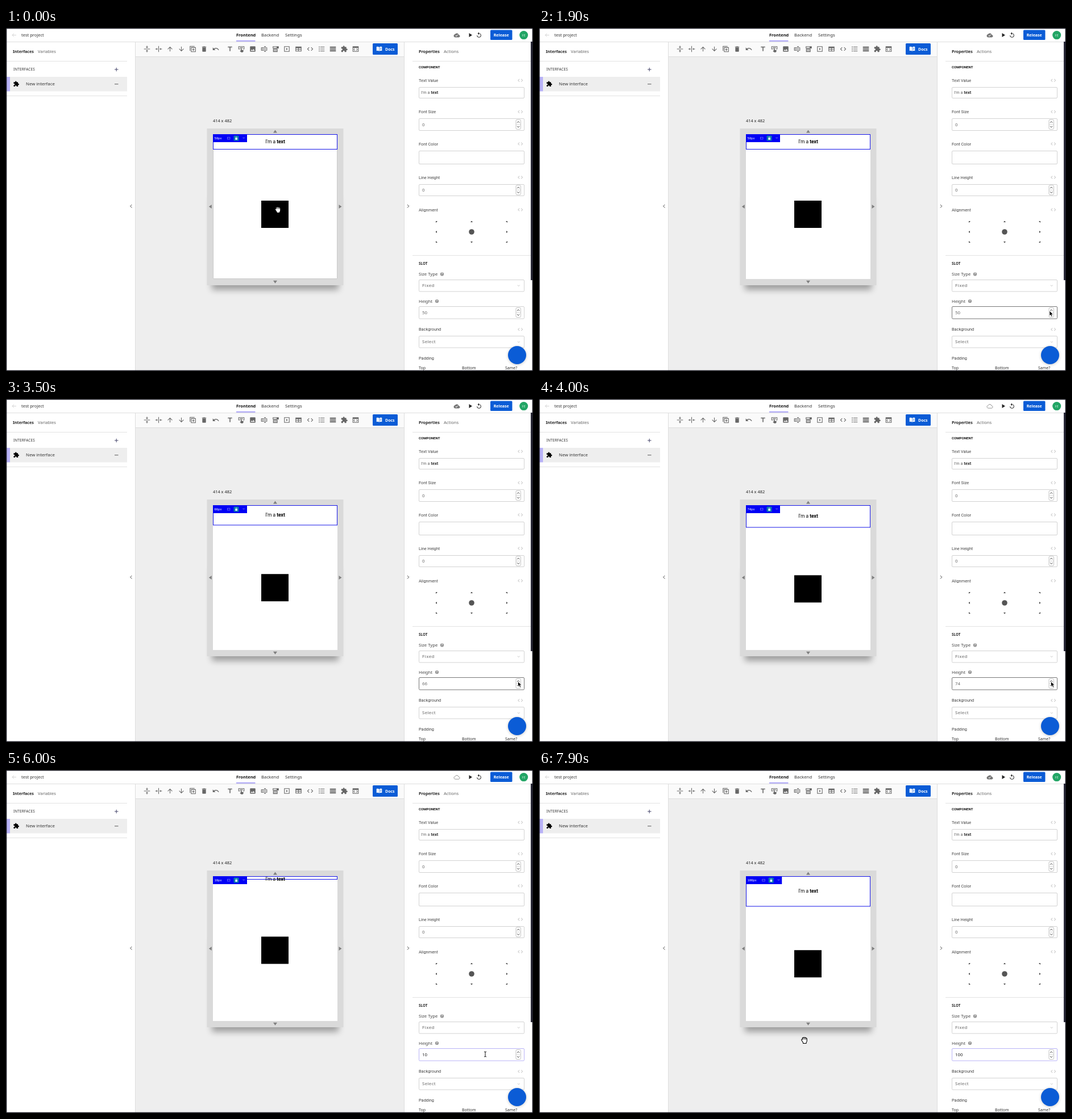
An HTML page for the animation above (8 s loop, 927 by 604 pixels).

```html
<!DOCTYPE html>
<html lang="en">
<head>
<meta charset="utf-8">
<title>Interface editor</title>
<style>
html, body { margin: 0; width: 100%; height: 100%; overflow: hidden; background: #fff; }
svg { display: block; width: 927px; height: 604px; }
text { font-family: "Noto Sans", sans-serif; white-space: pre; }
text.r { font-family: Roboto, sans-serif; }
text.m { font-family: "DejaVu Sans Mono", monospace; }
</style>
</head>
<body>
<svg id="stage" viewBox="0 0 927 604" xmlns="http://www.w3.org/2000/svg"></svg>
<script>
const NS = 'http://www.w3.org/2000/svg';
const stage = document.getElementById('stage');
const BLUE = '#0b5cd6', INK = '#333', GREY = '#666', PALE = '#bdbdbd';

function add(tag, attrs, parent = stage) {
  const el = document.createElementNS(NS, tag);
  for (const k in attrs) el.setAttribute(k, attrs[k]);
  return parent.appendChild(el);
}
const rect = (x, y, width, height, fill, more, parent) =>
  add('rect', { x, y, width, height, fill, ...more }, parent);
const circle = (cx, cy, r, fill, more) => add('circle', { cx, cy, r, fill, ...more });
const path = (d, more, parent) => add('path', { d, ...more }, parent);
const line = (d, stroke = INK, w = 1, parent) =>
  path(d, { fill: 'none', stroke, 'stroke-width': w }, parent);
const group = (parent) => add('g', {}, parent);

function text(x, y, str, size, fill = INK, more = {}, parent) {
  const el = add('text', { x, y, 'font-size': size, fill, ...more }, parent);
  el.textContent = str;
  return el;
}
const roboto = (x, y, str, size = 7.4, fill = '#444', more) =>
  text(x, y, str, size, fill, { class: 'r', ...more });

// Icons live on a 24 unit grid
function icon(d, x, y, size = 12.7, fill = GREY, turn = 0) {
  const k = size / 24;
  return path(d, { fill, 'fill-rule': 'evenodd',
    transform: `translate(${x} ${y}) rotate(${turn}) scale(${k}) translate(-12 -12)` });
}
const ICON = {
  split: 'M8 19h3v4h2v-4h3l-4-4-4 4zm8-14h-3V1h-2v4H8l4 4 4-4zM2 11v2h20v-2z',
  up: 'M4 12l1.41 1.41L11 7.83V20h2V7.83l5.58 5.59L20 12l-8-8-8 8z',
  copy: 'M2 2h16v2H4v14H2zM6 6h16v16H6zM8 8v12h12V8zM13 10h2v3h3v2h-3v3h-2v-3h-3v-2h3z',
  bin: 'M6 19c0 1.1.9 2 2 2h8c1.1 0 2-.9 2-2V7H6v12zM19 4h-3.5l-1-1h-5l-1 1H5v2h14V4z',
  undo: 'M12.5 8c-2.65 0-5.05.99-6.9 2.6L2 7v9h9l-3.62-3.62c1.39-1.16 3.16-1.88 5.12-1.88 3.54 0 6.55 2.31 7.6 5.5l2.37-.78C21.08 11.03 17.15 8 12.5 8z',
  title: 'M5 4v3h5.5v12h3V7H19V4z',
  button: 'M2 3h20v10h-4v-2h2V5H4v6h4v2H2zM7 7h10v2H7zM10 10h3v5l6 1v3l-2 4h-6l-4-5 1-1 2 1z',
  image: 'M21 19V5c0-1.1-.9-2-2-2H5c-1.1 0-2 .9-2 2v14c0 1.1.9 2 2 2h14c1.1 0 2-.9 2-2zM8.500 13.500l2.500 3L14.500 12l4.500 6H5z',
  input: 'M2 7h10v2H4v6h8v2H2zM18 7h4v10h-4v-2h2V9h-2zM12 3h6v2h-2v14h2v2h-6v-2h2V5h-2zM6 11h5v2H6z',
  select: 'M2 3h20v7H2zM4 5v3h11V5zM3 11h15v11H3zM5 13v1.500h11V13zM5 16v1.500h11V16zM5 19v1h11v-1z',
  play: 'M10 8v8l5-4zM3 3h18v18H3zM5 5v14h14V5z',
  table: 'M2 4h20v16H2zM4 9v3.500h7V9zM13 9v3.500h7V9zM4 14.500V18h7v-3.500zM13 14.500V18h7v-3.500z',
  code: 'M9.400 16.600L4.800 12l4.600-4.600L8 6l-6 6 6 6zM14.600 16.600l4.600-4.600-4.600-4.600L16 6l6 6-6 6z',
  list: 'M3 4h3v3H3zM3 10.500h3v3H3zM3 17h3v3H3zM8 4.500h14v2H8zM8 11h14v2H8zM8 17.500h14v2H8z',
  bars: 'M2 4h20v4H2zM2 10h20v4H2zM2 16h20v4H2z',
  puzzle: 'M20.5 11H19V7c0-1.1-.9-2-2-2h-4V3.5C13 2.12 11.88 1 10.500 1S8 2.12 8 3.500V5H4c-1.1 0-2 .9-2 2v3.800h1.500c1.490 0 2.700 1.210 2.700 2.700s-1.210 2.700-2.700 2.700H2V20c0 1.1.9 2 2 2h3.800v-1.500c0-1.490 1.210-2.700 2.700-2.700s2.700 1.210 2.700 2.700V22H17c1.1 0 2-.9 2-2v-4h1.500c1.380 0 2.500-1.120 2.500-2.500S21.880 11 20.500 11z',
  embed: 'M2 3h20v18H2zM4 8v11h16V8zM10 10l-3 3.500 3 3.500-1.500 1L5 13.500 8.500 9zM14 10l3 3.500-3 3.500 1.500 1 3.500-4.500L15.500 9z',
  reset: 'M12 5V1L7 6l5 5V7c3.310 0 6 2.690 6 6s-2.690 6-6 6-6-2.690-6-6H4c0 4.420 3.580 8 8 8s8-3.580 8-8-3.580-8-8-8z',
  cloud: 'M19.350 10.040C18.670 6.590 15.640 4 12 4 9.110 4 6.600 5.640 5.350 8.040 2.340 8.360 0 10.910 0 14c0 3.310 2.690 6 6 6h13c2.760 0 5-2.240 5-5 0-2.640-2.050-4.780-4.650-4.960z',
  tick: 'M10 17l-3.500-3.500 1.410-1.410L10 14.170 15.180 9l1.410 1.410z',
  book: 'M2 4c4-1 7-1 9.500 1v15C9 18 6 18 2 19zM22 4c-4-1-7-1-9.500 1v15c2.500-2 5.500-2 9.500-1zM14.500 8v1.500l5-.7V7.300zM14.500 12v1.500l5-.7v-1.500z'
};

// Panels
rect(0, 0, 927, 604, '#fff');
rect(228, 50, 472, 554, '#eee');
rect(228, 25, 472, 25, '#fafafa');
line('M0 24.500H927M227.500 24V604M700.500 24V604M228 50.500H700', '#dedede');
line('M1 58.500H213M1 119.500H213M715 58.500H923M715 400.500H923', '#e2e2e2');

// Top bar
line('M18 12.500H11M14 9.500L11 12.500L14 15.500', '#d4d4d4');
text(27, 15.200, 'test project', 7.5);
text(405, 15.300, 'Frontend', 7.5, '#111', { 'font-weight': 600 });
text(449, 15.300, 'Backend', 7.75);
text(491, 15.300, 'Settings', 7.8);
rect(405, 21.500, 33.500, 2.500, '#b9b3f7');
path('M814.500 9v7l5.500-3.500z', { fill: '#222' });
icon(ICON.reset, 832, 12.500, 11.500, '#222');
rect(852, 3.500, 38.500, 17.500, BLUE, { rx: 1.500 });
text(871.200, 15, 'Release', 7, '#fff', { 'font-weight': 600, 'text-anchor': 'middle' });
circle(910.700, 12.600, 7.500, '#22a565');
text(910.700, 14.700, 'FE', 5.800, '#c4ecd6', { 'text-anchor': 'middle' });
const saved = icon(ICON.cloud + ICON.tick, 793, 12.800, 11, '#757575');
const saving = icon(ICON.cloud, 793, 12.800, 10, 'none');
saving.setAttribute('stroke', '#777');
saving.setAttribute('stroke-width', 1.900);

// Left panel
text(12, 43.700, 'Interfaces', 7.2, '#222', { 'font-weight': 600 });
text(56, 43.700, 'Variables', 7.4, GREY);
text(13, 75.300, 'INTERFACES', 6.3, INK, { 'font-weight': 500, 'letter-spacing': .2 });
line('M191 73H197.500M194.200 69.800V76.300', '#32325a', .9);
rect(7, 86, 206, 25.500, '#eee');
rect(1, 86, 6, 25.500, '#b9b3f7');
icon(ICON.puzzle, 18, 98.500, 11, '#000');
text(35, 101.300, 'New interface', 7.8);
line('M191 98.800H197.500', '#444', .9);
line('M221.300 311L218.700 313.700L221.300 316.500M706 311L708.700 313.700L706 316.500', INK, .9);

// Tool bar
const tools = [['split', 248], ['split', 268.5, 90], ['up', 288.5], ['up', 308.5, 180],
  ['copy', 328.5], ['bin', 348.5], ['undo', 369], ['title', 394], ['button', 414],
  ['image', 434], ['input', 454], ['select', 474.5], ['play', 494], ['table', 514.5],
  ['code', 535], ['list', 555], ['bars', 575], ['puzzle', 595], ['embed', 615]];
for (const [name, x, turn] of tools) icon(ICON[name], x, 37, 12.700, GREY, turn);
rect(645, 27, 44, 20, BLUE, { rx: 1.500 });
icon(ICON.book, 656.500, 37, 11.500, '#fff');
text(667, 39.700, 'Docs', 7, '#fff', { 'font-weight': 600 });

// Artboard
text(364, 165.600, '414 x 482', 7.4, '#222');
rect(362, 300, 223, 161, '#000', { opacity: .34, style: 'filter:blur(6px)' });
rect(353.500, 177, 240, 276, '#dadada');
rect(364, 187, 219, 255, '#fff');
path('M470 184.500h7l-3.500-5zM470 444.800h7l-3.500 5zM361.800 311v7l-5-3.500zM585.500 311v7l5-3.500z',
  { fill: '#808080' });
const hover = line('M364.500 213V441.500H582.500V213', '#c9c9c9');
const mark = rect(449, 304, 48, 48, '#000');
const slot = rect(364.500, 187.500, 218, 26, 'none', { stroke: '#1616e8' });
const title = text(473.500, 203, "I'm a ", 8.46, '#000', { class: 'r', 'text-anchor': 'middle' });
add('tspan', { 'font-weight': 700 }, title).textContent = 'text';
const tag = rect(364, 187, 60, 14, '#0000f5');
const tagText = text(366.500, 196, '', 5.4, '#fff', { class: 'm' });
const tagIcons = group();
rect(389.500, 192.300, 4.500, 3.500, 'none', { stroke: '#8383ee', 'stroke-width': .7 }, tagIcons);
rect(400.500, 189.500, 9, 9, '#0878ad', { rx: 1 }, tagIcons);
rect(403.300, 193.500, 3.600, 3.200, '#fff', {}, tagIcons);
line('M404 193.500V192.500Q405.100 190.700 406.200 192.500V193.500', '#fff', .7, tagIcons);
line('M416 193.300H420.500M418.200 193.300V195', '#7171e8', .7, tagIcons);

// Properties panel
text(726, 43.700, 'Properties', 7.1, '#222', { 'font-weight': 600 });
text(770, 43.700, 'Actions', 7.6, GREY);
roboto(726, 71.300, 'COMPONENT', 6.1, '#111', { 'font-weight': 700 });

const field = (y, h) => rect(726.500, y + .5, 185, h, '#fff', { rx: 1.500, stroke: '#d2d2d2' });
function spinner(y) {
  rect(897, y - 8.500, 8.500, 17, '#fff', { rx: 2, stroke: '#b5b5b5', 'stroke-width': .8 });
  line(`M897 ${y}h8.500`, '#c4c4c4', .7);
  line(`M899 ${y - 3}l2.200 -2.200l2.200 2.200M899 ${y + 3}l2.200 2.200l2.200 -2.200`, '#333', .9);
}
const chevron = (y) => line(`M899.800 ${y}l2 1.700l2 -1.700`, PALE, .8);
function help(x, y) {
  circle(x, y, 3.100, '#949494');
  text(x, y + 1.900, '?', 5, '#fff', { 'text-anchor': 'middle', 'font-weight': 700 });
}

const labels = [['Text Value', 92.3], ['Font Size', 147.5], ['Font Color', 204],
  ['Line Height', 263], ['Alignment', 320], ['Background', 530.7]];
for (const [name, y] of labels) {
  roboto(726, y + 2.600, name);
  icon(ICON.code, 904.700, y, 11, '#c6c6c6');
}
field(104, 19);
const value = roboto(730, 116.400, "I'm a ", 7.4, GREY);
add('tspan', { 'font-weight': 700, fill: '#333' }, value).textContent = 'text';
for (const [y, h] of [[159, 21], [275, 20]]) {
  field(y, h);
  spinner(y + h / 2 + .3);
  text(732, y + h / 2 + 3, '0', 7.9, GREY);
}
field(216, 23);

for (const x of [757, 819, 881]) for (const y of [341, 359, 377]) {
  const dx = Math.sign(x - 819), dy = Math.sign(y - 359);
  if (!dx && !dy) circle(x, y, 4.800, '#555');
  else if (dx && dy) path(`M${x + dx} ${y + dy}h${-3 * dx}l${3 * dx} ${-3 * dy}z`, { fill: '#444',
    transform: dy < 0 ? '' : `translate(0 0)` });
  else path(dx ? `M${x - dx} ${y - 2}v4l${2.500 * dx} -2z` : `M${x - 2} ${y - dy}h4l-2 ${2.500 * dy}z`,
    { fill: '#444' });
}

text(726, 417, 'SLOT', 6.3, '#222', { 'font-weight': 600 });
text(726, 436.200, 'Size Type', 7.7, '#444');
help(767, 433.400);
const sizeBox = field(443, 20.500);
const sizeText = text(732, 456.300, 'Fixed', 7.9, GREY, { 'letter-spacing': .5 });
const sizeArrow = chevron(452.800);
text(726, 483.800, 'Height', 7.6, '#444');
help(758, 481);
const heightBox = field(490, 21.500);
const selection = rect(732, 496, 9.300, 10, '#aab4ec');
const heightText = text(732, 503.800, '', 7.9, GREY);
spinner(501);
field(542, 20.500);
text(732, 555.300, 'Select', 7.9, GREY, { 'letter-spacing': .35 });
chevron(552);
roboto(726, 584, 'Padding');
for (const [x, s] of [[726, 'Top'], [802, 'Bottom'], [878, 'Same?']])
  text(x, 601.300, s, 7, '#333', { 'font-weight': 500 });

circle(899, 577, 16, '#000', { opacity: .22, style: 'filter:blur(2.5px)' });
circle(899, 576, 16, BLUE);

// Window edge and scroll bar
rect(923, 24, 3, 420, '#2b2b3a');
rect(.5, .5, 926, 603, 'none', { stroke: '#16161f', 'stroke-width': 1.600 });

// Pointers, each drawn around its own hot spot
const pointers = { hand: group(), arrow: group(), beam: group() };
path('M-3.500 1.500L-4.800 -.5Q-5 -2.300 -3.200 -1.500V-4Q-2.400 -5.500 -1.300 -4.300Q-.2 -6 1 -4.400Q2.400 -5.600 3.200 -3.800Q4.900 -4.300 4.800 -2.300V1Q4.500 3 3.500 4.200V5.500H-1.800V4.200Z',
  { fill: '#fff', stroke: '#000', 'stroke-width': 1.100, 'stroke-linejoin': 'round' }, pointers.hand);
line('M-1.300 -4V-1.200M1 -4V-1.200M3.100 -3.500V-1', '#000', .8, pointers.hand);
path('M0 0V8.800L2 7L3.500 10.300L5.100 9.600L3.600 6.400H6.300Z',
  { fill: '#000', stroke: '#fff', 'stroke-width': .7 }, pointers.arrow);
line('M-2 -4.500Q0 -4.500 0 -3.500Q0 -4.500 2 -4.500M0 -4V4M-2 4.500Q0 4.500 0 3.500Q0 4.500 2 4.500',
  '#111', 1, pointers.beam);

// Step tables: time, then the values held from that time on
const pointerSteps = [
  [0, 478, 320, 'hand'], [600, 486, 328, 'hand'], [700, 508, 349, 'hand'],
  [800, 546, 380, 'hand'], [900, 602, 410, 'hand'], [1000, 684, 436, 'hand'],
  [1100, 790, 455, 'arrow'], [1200, 853, 471, 'arrow'], [1300, 872, 485, 'arrow'],
  [1400, 884, 494, 'arrow'], [1500, 889, 496, 'arrow'], [1700, 894, 497, 'arrow'],
  [1900, 898, 498, 'arrow'], [2100, 900.5, 498, 'arrow'], [2500, 900.5, 497.5, 'arrow'],
  [4600, 893, 499, 'beam'], [4700, 862, 500, 'beam'], [4800, 843, 500.5, 'beam'],
  [7200, 846, 500, 'beam'], [7300, 850, 499, 'beam'], [7500, 800, 488, 'beam'],
  [7600, 705, 470, 'arrow'], [7800, 580, 475, 'hand'], [7900, 466.5, 476, 'hand']];
const heightSteps = [[0, 50], [3000, 56], [3100, 58], [3200, 60], [3300, 62], [3400, 64],
  [3500, 66], [3700, 68], [3800, 70], [3900, 72], [4000, 74], [4200, 76], [4300, 77],
  [4400, 78], [5700, 1], [6000, 10], [6100, 100]];
const savedSteps = [[0, 1], [3000, 0], [3500, 1], [3700, 0], [4700, 1], [5800, 0], [6700, 1]];
const borderSteps = [[0, '#d2d2d2'], [1500, '#777'], [5000, '#b9b3f7']];

const at = (steps, t) => steps.filter(s => s[0] <= t).pop().slice(1);
const show = (el, on) => el.setAttribute('visibility', on ? 'visible' : 'hidden');
const SCALE = .529, LOOP = 8000;

function draw(t) {
  const [px, py, kind] = at(pointerSteps, t);
  for (const k in pointers) show(pointers[k], k === kind);
  pointers[kind].setAttribute('transform', `translate(${px} ${py})`);

  const [h] = at(heightSteps, t);
  const wide = (String(h).length - 2) * 3.250;
  slot.setAttribute('height', Math.round(h * SCALE * 2) / 2 - .5);
  title.setAttribute('y', Math.max(187 + h * SCALE / 2, 192) + 2.900);
  mark.setAttribute('y', 304 + (h - 50) * SCALE / 2);
  tag.setAttribute('width', 60 + wide);
  tagIcons.setAttribute('transform', `translate(${wide} 0)`);
  tagText.textContent = h + 'px';
  heightText.textContent = h;
  heightText.setAttribute('fill', t >= 5000 ? '#222' : GREY);
  heightBox.setAttribute('stroke', at(borderSteps, t)[0]);

  const [done] = at(savedSteps, t);
  show(saved, done);
  show(saving, !done);
  show(hover, t < 900);
  show(selection, t >= 5100 && t < 5700);

  const over = t >= 1100 && t < 1300;
  sizeBox.setAttribute('stroke', over ? '#777' : '#d2d2d2');
  sizeText.setAttribute('fill', over ? '#111' : GREY);
  sizeArrow.setAttribute('stroke', over ? '#555' : PALE);
}

const start = performance.now();
function tick() {
  draw((performance.now() - start) % LOOP);
  requestAnimationFrame(tick);
}
tick();
</script>
</body>
</html>
```
